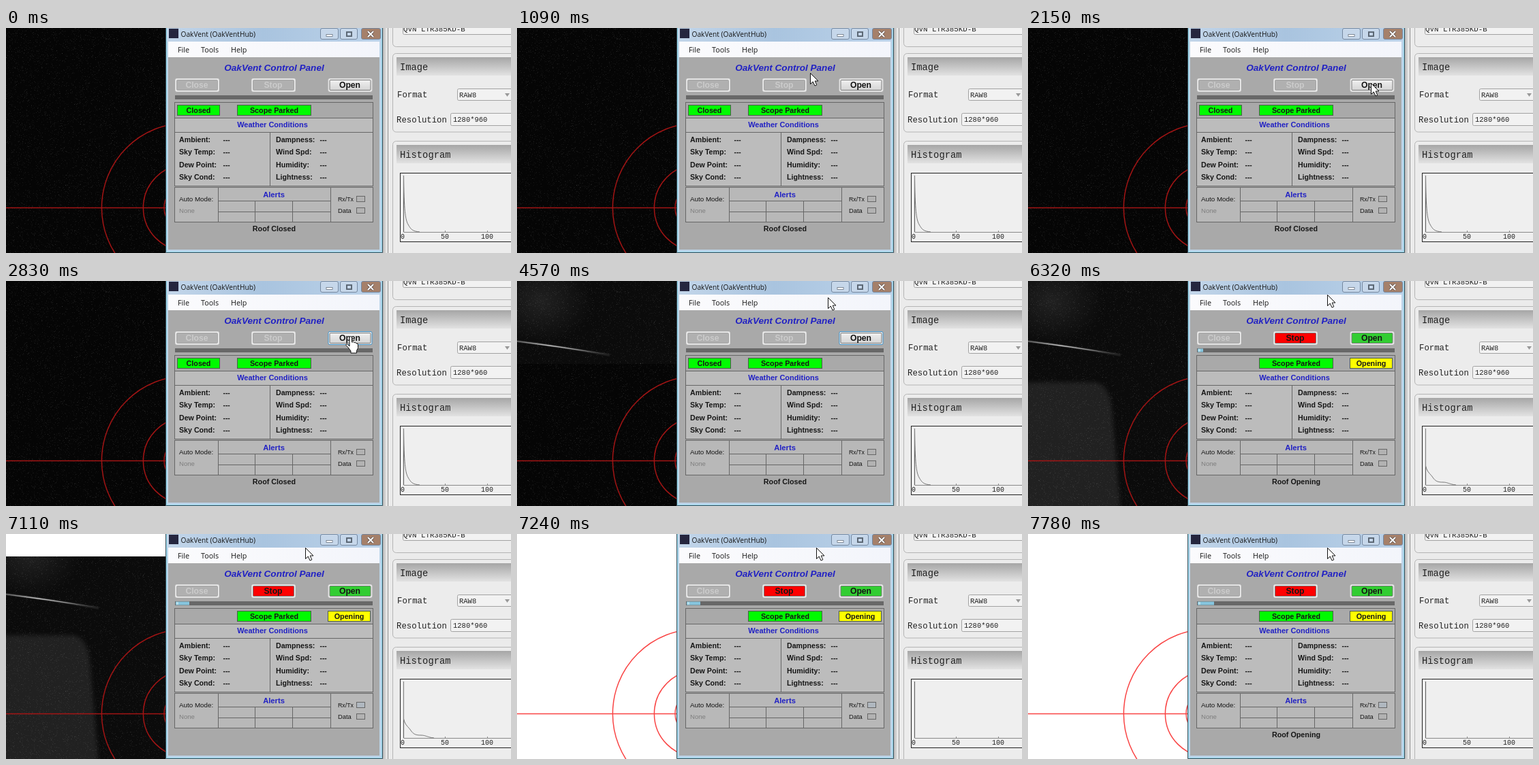
Write an HTML page with a canvas that moves like this. It is 741 by 331 pixels and loops after 8000 ms.

```html
<!DOCTYPE html>
<html lang="en">
<head>
<meta charset="utf-8">
<title>Roof control panel</title>
<style>
html, body { margin: 0; width: 100%; height: 100%; overflow: hidden; background: #040404; }
canvas, svg { position: absolute; left: 0; top: 0; display: block; }
text { font-family: "Liberation Sans", Arial, sans-serif; font-size: 10.75px; fill: #161616; white-space: pre; }
.b { font-weight: bold; }
.blue { fill: #2121c4; font-weight: bold; font-size: 11px; }
.head { font-size: 13.57px; font-style: italic; }
.btn { font-size: 12.2px; font-weight: bold; }
.off { fill: #cbcbcb; }
.ui { font-family: "Open Sans", "Noto Sans", sans-serif; font-size: 10.8px; }
.mono { font-family: "Liberation Mono", "Courier New", monospace; fill: #222; }
.mid { text-anchor: middle; }
</style>
</head>
<body>
<canvas id="grain" width="234" height="331"></canvas>
<svg id="stage" width="741" height="331" viewBox="0 0 741 331">
  <defs>
    <linearGradient id="bar" x1="0" x2="1" y1="0" y2="0">
      <stop offset="0" stop-color="#c3d6ea"/><stop offset=".45" stop-color="#a9c4df"/><stop offset="1" stop-color="#bdd3ea"/>
    </linearGradient>
    <linearGradient id="menu" x1="0" x2="1" y1="0" y2="0">
      <stop offset="0" stop-color="#fbfbfd"/><stop offset="1" stop-color="#f3f5fb"/>
    </linearGradient>
    <linearGradient id="cap" x1="0" x2="0" y1="0" y2="1">
      <stop offset="0" stop-color="#a6a6a6"/><stop offset="1" stop-color="#e2e2e2"/>
    </linearGradient>
    <linearGradient id="shade" x1="0" x2="1" y1="0" y2="0">
      <stop offset="0" stop-color="#b8b8b8"/><stop offset="1" stop-color="#f2f2f2"/>
    </linearGradient>
    <linearGradient id="face" x1="0" x2="0" y1="0" y2="1">
      <stop offset="0" stop-color="#f0f0f0"/><stop offset="1" stop-color="#d4d4d4"/>
    </linearGradient>
    <linearGradient id="streak" gradientUnits="userSpaceOnUse" x1="0" y1="88" x2="136" y2="109">
      <stop offset="0" stop-color="#aaa" stop-opacity=".45"/><stop offset=".35" stop-color="#ddd" stop-opacity=".9"/>
      <stop offset=".65" stop-color="#ccc" stop-opacity=".7"/><stop offset="1" stop-color="#999" stop-opacity="0"/>
    </linearGradient>
    <radialGradient id="haze">
      <stop offset="0" stop-color="#fff" stop-opacity=".09"/><stop offset="1" stop-color="#fff" stop-opacity="0"/>
    </radialGradient>
    <filter id="soft" x="-20%" y="-20%" width="140%" height="140%"><feGaussianBlur stdDeviation="3"/></filter>
    <filter id="thin" x="-20%" y="-60%" width="140%" height="220%"><feGaussianBlur stdDeviation=".5"/></filter>
    <clipPath id="fieldClip"><rect width="234" height="331"/></clipPath>
    <clipPath id="loaded"><rect id="load" width="234" height="0"/></clipPath>
  </defs>

  <g clip-path="url(#fieldClip)">
    <g clip-path="url(#loaded)">
      <rect width="234" height="331" fill="#fff" opacity=".025"/>
      <ellipse cx="35" cy="30" rx="75" ry="62" fill="url(#haze)"/>
      <path d="M-10 149H98Q119 152 123 187L136 340H-10Z" fill="#fff" opacity=".09" filter="url(#soft)"/>
      <path d="M0 88.5Q62 96 136 109" fill="none" stroke="#bbb" stroke-width="4" opacity=".1" filter="url(#thin)"/>
      <path d="M0 88Q62 95.5 136 108.5L62 97.5L0 89.2Z" fill="url(#streak)" stroke="url(#streak)" stroke-width=".4" filter="url(#thin)"/>
    </g>
    <rect id="white" width="234" height="0" fill="#fff"/>
    <g id="target" fill="none" stroke="#a31414" stroke-width="1.5">
      <path d="M0 264.4H234"/>
      <circle cx="265" cy="264.4" r="124.6"/><circle cx="265" cy="264.4" r="63.6"/><circle cx="265" cy="264.4" r="33"/>
    </g>
  </g>

  <g id="camera"></g>
  <g id="panel"></g>
  <path id="arrow" d="M.5 .5V16.5L4.3 13L7 19L9.8 17.8L7.2 12H12Z" fill="#fff" stroke="#111" stroke-linejoin="round"/>
  <path id="hand" d="M6 15V2.5Q6 .6 7.7 .6Q9.4 .6 9.4 2.5V9Q12.4 7.6 13 9.7Q15.4 8.7 16 10.8Q18.6 10.2 18.5 13V17.5L16.5 21.5V25H8V22L4.2 17L.9 13.4Q.5 11.2 3 11.8Z" fill="#fff" stroke="#111" stroke-linejoin="round"/>
</svg>
<script>
const LOOP = 8000;
const $ = id => document.getElementById(id);
let layer;

function add(tag, attrs, text) {
  const el = document.createElementNS("http://www.w3.org/2000/svg", tag);
  for (const k in attrs) el.setAttribute(k, attrs[k]);
  if (text) el.textContent = text;
  layer.appendChild(el);
  return el;
}
const rect = (x, y, width, height, fill, more) => add("rect", { x, y, width, height, fill, ...more });
const line = (d, stroke, more) => add("path", { d, stroke, fill: "none", ...more });
const label = (x, y, s, cls, size) => {
  const el = add("text", { x, y, class: cls || "" }, s);
  if (size) el.style.fontSize = size + "px";
  return el;
};

// Sensor grain
function drawGrain() {
  const c = $("grain").getContext("2d");
  let seed = 7;
  const rnd = () => (seed = seed * 16807 % 2147483647) / 2147483647;
  c.fillStyle = "#050505";
  c.fillRect(0, 0, 234, 331);
  for (let i = 0; i < 14000; i++) {
    c.fillStyle = `rgba(255,255,255,${rnd() ** 2 * 0.1})`;
    c.fillRect(rnd() * 234 | 0, rnd() * 331 | 0, 1, 1);
  }
}

// Camera settings at the right
layer = $("camera");
const group = (y, h) => rect(567.5, y, 200, h, "#ececec", { rx: 5, stroke: "#b4b4b4" });
const combo = (x, y, w, h) => rect(x, y, w, h, "#f2f2f2", { rx: 2, stroke: "#a2a2a2" });
function caption(y, s) {
  rect(573, y, 168, 27, "url(#cap)");
  label(578, y + 18.5, s, "mono", 13.8);
}
rect(552, 0, 189, 331, "#ebebeb");
rect(553, 0, 7, 331, "url(#shade)");
line("M560.5 0V331", "#8b8b8b");
group(-20, 47.5);
combo(582.5, -20, 170, 29.5);
label(583, 5, "QVN LTR385KD-B", "mono", 10.8);
group(37.5, 115.5);
caption(43, "Image");
label(574, 102, "Format", "mono", 12.3);
combo(662.5, 89.5, 90, 17);
label(665, 101.5, "RAW8", "mono", 10.5);
add("path", { d: "M732 96H739L735.5 101Z", fill: "#999" });
label(573, 139, "Resolution", "mono", 12.3);
combo(652.5, 125.5, 100, 18);
label(656, 138, "1280*960", "mono", 10.5);
group(166.5, 190);
caption(172, "Histogram");
rect(578.5, 213.5, 190, 101, "#efefef", { stroke: "#222" });
line("M583.5 300.5H741M644.5 298V301M706.5 298V301", "#888");
line("M583.5 217V300", "#555");
const curve = line("", "#777");
label(579, 310, "0", "mono", 10);
label(638, 310, "50", "mono", 10);
label(697, 310, "100", "mono", 10);

// Roof control window
layer = $("panel");
rect(234, 0, 319, 331, "#bcd5ea");
rect(234, 0, 319, 20, "url(#bar)");
line("M234.5 0V330.5H552.5V0", "#3d4c58");
line("M235.5 0V329.5H551.5V0", "#8fd8ea");
rect(239, 1, 14, 14, "#25263f");
label(256.5, 13, "OakVent (OakVentHub)", "ui", 10.2);
const cap = (x, w, fill) => rect(x + .5, .5, w, 16, fill, { rx: 2.5, stroke: "#7588a0" });
cap(461, 26, "#c6d7ea");
cap(490, 25, "#c6d7ea");
cap(521, 28, "#a5806a");
rect(470, 9.5, 9, 3, "#fff", { stroke: "#66727f", "stroke-width": .8 });
rect(500, 6, 7, 6, "none", { stroke: "#5c6875", "stroke-width": 2 });
line("M531 5L539 13M539 5L531 13", "#594c4b", { "stroke-width": 3.6 });
line("M531 5L539 13M539 5L531 13", "#fff", { "stroke-width": 2 });
rect(238, 20, 310, 306, "#a9a9a9");
rect(238, 20, 310, 23, "url(#menu)");
label(252, 36, "File", "ui");
label(286, 36, "Tools", "ui");
label(330, 36, "Help", "ui");
label(393.5, 63, "OakVent Control Panel", "blue head mid");

function button(x, s) {
  const outer = rect(x + .5, 74.5, 64, 19, "#f2f2f2", { rx: 2, stroke: "#d6d6d6" });
  const face = rect(x + 2.5, 76.5, 60, 15, "#b0b0b0", { rx: 1 });
  return { outer, face, text: label(x + 32, 88.3, s, "btn mid off") };
}
function paint(b, fill, on, edge) {
  b.face.setAttribute("fill", fill);
  b.face.setAttribute("stroke", on ? "#777" : "#a4a4a4");
  b.text.setAttribute("class", "btn mid" + (on ? "" : " off"));
  b.outer.setAttribute("stroke", edge || "#d6d6d6");
}
const close = button(248, "Close"), stop = button(360, "Stop"), open = button(472.5, "Open");
paint(close, "#b0b0b0", false);

rect(248, 99, 290, 6, "#686868");
const progress = rect(249, 99.5, 0, 5, "#86c5de");
const sheen = rect(250, 100, 3, 4, "#b5dfeb");

const edge = "#666";
rect(247.5, 109.5, 291, 123, "#bcbcbc", { stroke: edge });
rect(248, 110, 290, 22, "#a9a9a9");
line("M247 132.5H539M247 153.5H539M387.5 153V232", edge);
function badge(x, w, fill, s) {
  const g = add("g", {}), parent = layer;
  layer = g;
  rect(x + .5, 113.5, w, 15, fill, { stroke: "#4c5c4c" });
  label(x + w / 2 + .5, 125, s, "b mid");
  layer = parent;
  return g;
}
const closed = badge(251, 62, "#00fb00", "Closed");
badge(339, 108, "#00fb00", "Scope Parked");
const opening = badge(472, 62, "#ffff00", "Opening");
label(391, 146, "Weather Conditions", "blue mid");
[["Ambient:", "Dampness:"], ["Sky Temp:", "Wind Spd:"], ["Dew Point:", "Humidity:"], ["Sky Cond:", "Lightness:"]]
  .forEach(([a, b], i) => {
    const y = 168 + i * 18.4;
    label(254, y, a, "b", 10.65);
    label(318.5, y, "---", "b", 10.2);
    label(396, y, b, "b", 10.65);
    label(460.5, y, "---", "b", 10.2);
  });

rect(247.5, 234.5, 291, 51, "#b8b8b8", { stroke: edge });
line("M311.5 234V286M476.5 234V286M311 254.5H477M311 270.5H477M365.5 254V286M420.5 254V286", edge);
label(254, 255, "Auto Mode:", "", 9.8);
label(254, 272, "None", "", 9.6).style.fill = "#7e7e7e";
label(393, 249, "Alerts", "blue mid", 11.2);
label(487, 255, "Rx/Tx", "", 8.8);
label(487, 272, "Data", "", 9.4);
const lamp = rect(514.5, 247.5, 12, 8, "#b2b2b2", { stroke: "#666" });
rect(514.5, 264.5, 12, 8, "#b2b2b2", { stroke: "#666" });
const status = label(393.5, 299, "", "b mid");

// Tables: [start ms, value...]
const pointer = [
  [0, "", 0, 0], [290, "arrow", 700, 300], [420, "arrow", 588, 210], [550, "arrow", 485, 122],
  [680, "arrow", 431, 76], [830, "arrow", 424, 64], [1090, "arrow", 430, 66], [1220, "arrow", 446, 71],
  [1350, "arrow", 463, 76], [1480, "arrow", 479, 80], [1610, "arrow", 490, 81], [1760, "arrow", 495, 81],
  [1890, "arrow", 499, 81], [2020, "arrow", 501, 81], [2150, "arrow", 503, 81], [2420, "hand", 498, 77],
  [2560, "hand", 498, 79], [2700, "hand", 498, 81], [3770, "hand", 496, 81], [4310, "arrow", 480, 55],
  [4440, "arrow", 463, 33], [4570, "arrow", 456, 24], [4700, "arrow", 453, 21], [4830, "arrow", 452, 20],
  [5630, "arrow", 445, 20], [5780, "arrow", 442, 20], [5910, "arrow", 439, 20]
];
const loadSteps = [[0, 0], [4310, 20], [4440, 70], [4570, 122], [4700, 220], [4830, 331]];
const whiteSteps = [[0, 0], [7110, 33], [7240, 331]];
const barSteps = [[0, 249], [5370, 251], [5630, 253], [6170, 255], [6320, 257], [6580, 262], [6980, 266], [7110, 269], [7500, 271], [7650, 273]];
const lampSteps = [[0, 0], [1220, 1], [1480, 0], [2560, 1], [2700, 0], [6580, 1]];
const statusSteps = [[0, "Roof Closed"], [5370, ""], [6170, "Roof Opening"], [6980, ""], [7500, "Roof Opening"]];
const curves = [
  [0, "M583.5 217C584 268 586 282 590 289S596 299 607 300"],
  [4830, "M583.5 217V272C586 282 590 283 594 289S602 296 609 296S618 299 628 300"],
  [7240, ""]
];

const row = (steps, t) => steps.findLast(s => s[0] <= t);
const at = (steps, t) => row(steps, t)[1];
const show = (el, on) => el.setAttribute("visibility", on ? "visible" : "hidden");

function draw(t) {
  const [, kind, x, y] = row(pointer, t);
  for (const id of ["arrow", "hand"]) {
    show($(id), id === kind);
    $(id).setAttribute("transform", `translate(${x} ${y})`);
  }
  $("load").setAttribute("height", at(loadSteps, t));
  const w = at(whiteSteps, t);
  $("white").setAttribute("height", w);
  $("target").setAttribute("stroke", w > 300 ? "#f94444" : "#a31414");
  curve.setAttribute("d", at(curves, t));

  const moving = t >= 4960;
  show(closed, !moving);
  show(opening, moving);
  paint(stop, moving ? "#ff0000" : "#b0b0b0", moving);
  const hot = t >= 2420 && !moving, press = t >= 2420 && t < 2700;
  paint(open, moving ? "#32cd32" : press ? "#cfe6f4" : "url(#face)", true, hot ? "#3c8fc6" : "");

  const p = at(barSteps, t) - 249;
  progress.setAttribute("width", p);
  show(sheen, p > 6);
  lamp.setAttribute("fill", at(lampSteps, t) ? "#b0b8c0" : "#b2b2b2");
  status.textContent = at(statusSteps, t);
}

drawGrain();
draw(0);
const start = performance.now();
function tick() {
  draw((performance.now() - start) % LOOP);
  requestAnimationFrame(tick);
}
requestAnimationFrame(tick);
</script>
</body>
</html>
```
